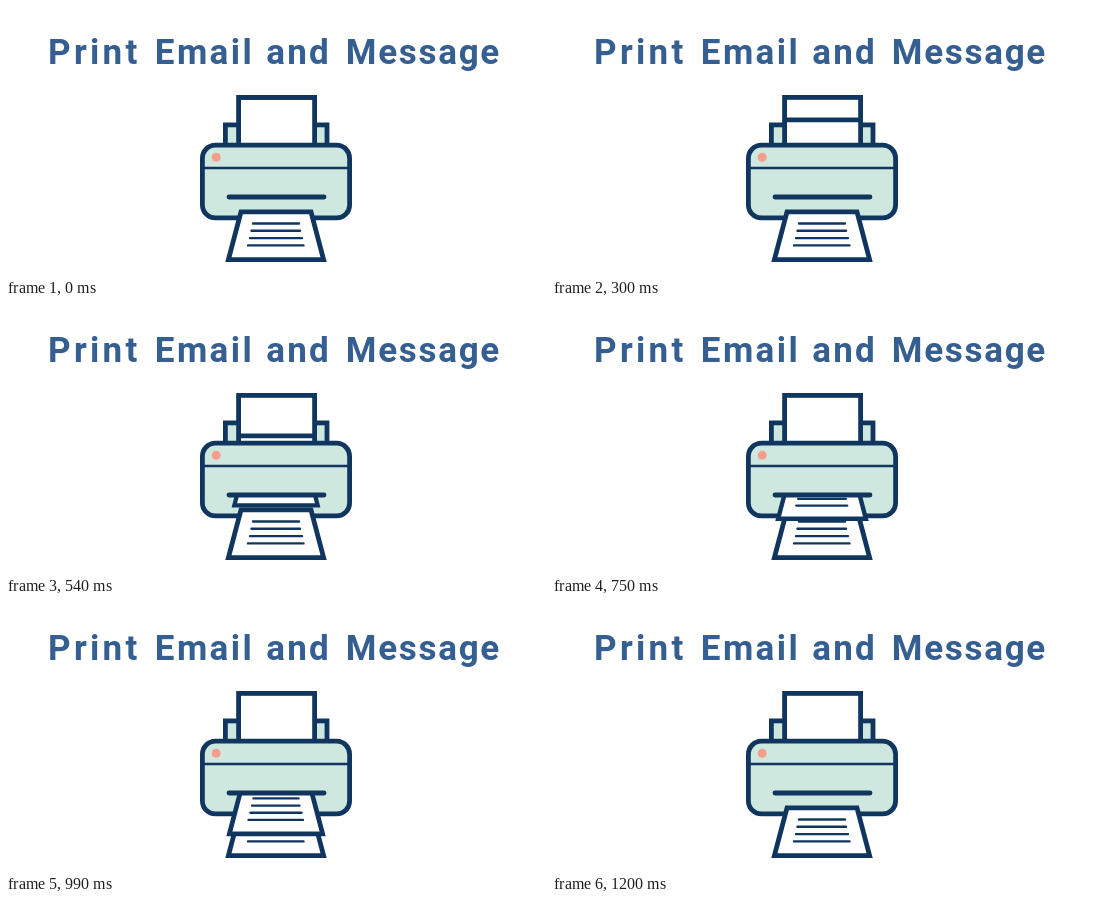
Animation of 540 by 270 pixels, one loop 1650 ms. Source, as an HTML page:

```html
<!DOCTYPE html>
<html lang="en">
<head>
<meta charset="utf-8">
<title>Print Email and Message</title>
<style>
  html, body { margin: 0; width: 100%; height: 100%; overflow: hidden; background: #fff; }
  svg { display: block; width: 100vw; height: 100vh; }
  .title { font: 700 35px Roboto, "Open Sans", sans-serif; fill: #365f91; }
  .ink { stroke: #10365f; stroke-width: 4.8; }
  .thin { stroke-width: 2.4; stroke-linecap: round; }
  .mint { fill: #cfe8df; }
  .white { fill: #fff; }
</style>
</head>
<body>
<svg viewBox="0 0 540 270">
  <defs>
    <clipPath id="below"><rect x="190" y="191" width="160" height="79"/></clipPath>
    <!-- Page with its bottom centre at the origin -->
    <g id="page" class="ink">
      <path class="white" d="M-35 -50.1H35L47.6 -2.4H-47.6Z"/>
      <path class="thin" fill="none" d="M-23 -38.5H23M-24.5 -31.2H24M-26 -23.9H26M-28 -16.6H27.5"/>
    </g>
  </defs>

  <text class="title" y="58">
    <tspan x="42" letter-spacing="3.3">Print</tspan>
    <tspan x="148.8" letter-spacing="2.4">Email</tspan>
    <tspan x="260.2" letter-spacing="2.2">and</tspan>
    <tspan x="339.8" letter-spacing="1.7">Message</tspan>
  </text>

  <g class="ink">
    <rect class="mint" x="219.4" y="118.9" width="101.6" height="30"/>
    <rect class="white" x="232.6" y="91.4" width="76" height="60"/>
    <path id="feed" d="M232 0H309"/>
    <rect class="mint" x="196.4" y="139.2" width="147.2" height="72.7" rx="13"/>
    <path class="thin" d="M197 162H343"/>
  </g>
  <circle cx="210.2" cy="151.2" r="4.5" fill="#f79d8c"/>

  <use href="#page" x="270" y="256"/>
  <g clip-path="url(#below)"><use id="sheet" href="#page"/></g>
  <path class="ink" stroke-linecap="round" d="M223 191H318"/>
</svg>
<script>
  const LOOP = 1650, STEP = 30, DONE = 1200;
  const feed = document.getElementById("feed");
  const sheet = document.getElementById("sheet");

  function draw(ms) {
    const t = Math.floor((ms % LOOP) / STEP) * STEP;

    // Blank paper sinks into the printer at a steady speed
    feed.setAttribute("transform", `translate(0 ${Math.min(91.4 + 0.075 * t, 142)})`);

    // Printed page slides out, speeding up and growing toward the viewer
    const u = t - 540;
    const bottom = t < DONE ? 203.5 + 0.06 * u + 0.000018 * u * u : 256;
    const scale = Math.min(1, 1 - (240 - bottom) * 0.0034);
    sheet.setAttribute("transform", `translate(270 ${bottom}) scale(${scale})`);
    sheet.setAttribute("visibility", t > 300 && t < DONE ? "visible" : "hidden");
  }

  const start = performance.now();
  function tick() {
    draw(performance.now() - start);
    requestAnimationFrame(tick);
  }
  tick();
</script>
</body>
</html>
```
